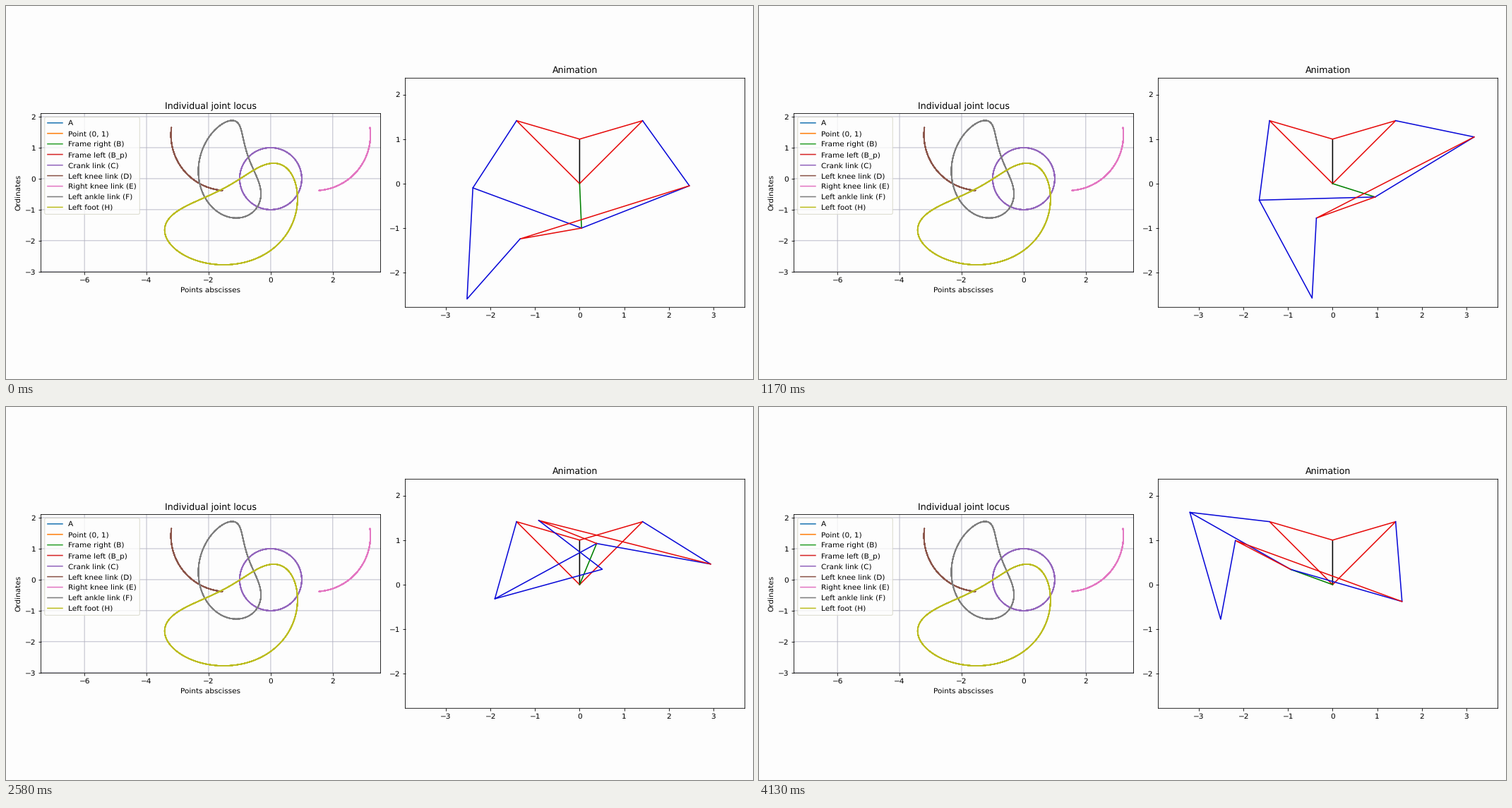
Recreate the animation shown at these times as a matplotlib script. Size 1058 by 529 pixels, loop 4180 ms.

```python
import numpy as np
import matplotlib.pyplot as plt
from matplotlib.animation import FuncAnimation

W, H = 1058, 529
TICK_MS, LOOP_MS = 20, 4180
POSES, FPS = 100, 24
STEP = np.radians(2.5)
BG = "#fdfdfd"
RED, BLUE = "#e60c0c", "#0a0ad8"

# Linkage dimensions
FEMUR, ROCKER_L, ROCKER_S, TIBIA, SHIN = 1.8, 2.6, 1.4, 2.5, 1.8
ANKLE_ANGLE = np.pi - 0.2
ORIGIN, TOP = 0j, 1j
B = 2 * np.exp(1j * np.pi / 4)
B_P = -B.conjugate()


def pivot(p, rp, q, rq, side):
    """Intersection of two circles, on the chosen side of the line p to q."""
    d = abs(q - p)
    along = (rp**2 - rq**2 + d**2) / (2 * d)
    off = np.sqrt(np.maximum(rp**2 - along**2, 0))
    return p + (q - p) / d * (along + side * 1j * off)


def joints(turn):
    """Moving joints as complex positions for a crank angle."""
    c = np.exp(1j * turn)
    d = pivot(B_P, FEMUR, c, ROCKER_L, -1)
    e = pivot(B, FEMUR, c, ROCKER_L, 1)
    f = c + ROCKER_S * (e - c) / abs(e - c) * np.exp(1j * ANKLE_ANGLE)
    h = pivot(d, TIBIA, f, SHIN, -1)
    return c, d, e, f, h


def xy(points):
    z = np.asarray(points)
    return z.real, z.imag


def panel(x0, y0, x1, y1, cx, cy, unit):
    """Axes on a pixel box, with the data origin at (cx, cy)."""
    ax = fig.add_axes([x0 / W, 1 - y1 / H, (x1 - x0) / W, (y1 - y0) / H],
                      facecolor=BG)
    ax.set_xlim((x0 - cx) / unit, (x1 - cx) / unit)
    ax.set_ylim((cy - y1) / unit, (cy - y0) / unit)
    return ax


plt.rcParams.update({"font.family": "DejaVu Sans", "text.hinting": "none",
                     "path.snap": False})
fig = plt.figure(figsize=(14, 7), dpi=W / 14, facecolor=BG)

# Left panel: path of every joint over several laps
locus_ax = panel(49.5, 152.4, 530.5, 377.3, 374.9, 244.9, 43.96)
laps = -np.pi / 2 + STEP * np.arange(1, 6 * 144 + 1)
still = [np.full(laps.size, p) for p in (ORIGIN, TOP, B, B_P)]
names = ["A", "Point (0, 1)", "Frame right (B)", "Frame left (B_p)",
         "Crank link (C)", "Left knee link (D)", "Right knee link (E)",
         "Left ankle link (F)", "Left foot (H)"]
for name, path in zip(names, still + list(joints(laps))):
    locus_ax.plot(*xy(path), label=name)
locus_ax.set_title("Individual joint locus")
locus_ax.set_xlabel("Points abscisses")
locus_ax.set_ylabel("Ordinates")
locus_ax.set_xticks(range(-6, 3, 2))
locus_ax.set_yticks(range(-3, 3))
locus_ax.grid(color="#b0b0c0")
locus_ax.legend(loc="upper left", facecolor=BG, edgecolor="#d4d4c4")

# Right panel: the moving linkage
move_ax = panel(565.6, 102.3, 1046.6, 427.3, 812.4, 251.9, 63.13)
move_ax.set_title("Animation")
move_ax.set_xticks(range(-3, 4))
move_ax.set_yticks(range(-2, 3))
colors = ["k", RED, RED, "g", BLUE, BLUE, RED, BLUE]
bars = [move_ax.plot([], [], color=col)[0] for col in colors]


def draw(i):
    # The pose changes 24 times a second; the last one is held to the end
    now = (i + 0.5) * TICK_MS + 4.9
    pose = min(int(now * FPS / 1000), POSES - 1)
    c, d, e, f, h = joints(-np.pi / 2 + STEP * (pose + 1))
    chains = [(ORIGIN, TOP), (ORIGIN, B, TOP), (ORIGIN, B_P, TOP),
              (ORIGIN, c), (B_P, d, c), (B, e, c), (c, f, e), (d, h, f)]
    for bar, chain in zip(bars, chains):
        bar.set_data(*xy(chain))
    return bars


anim = FuncAnimation(fig, draw, frames=LOOP_MS // TICK_MS, interval=TICK_MS,
                     repeat=True, repeat_delay=0)
plt.show()
```
